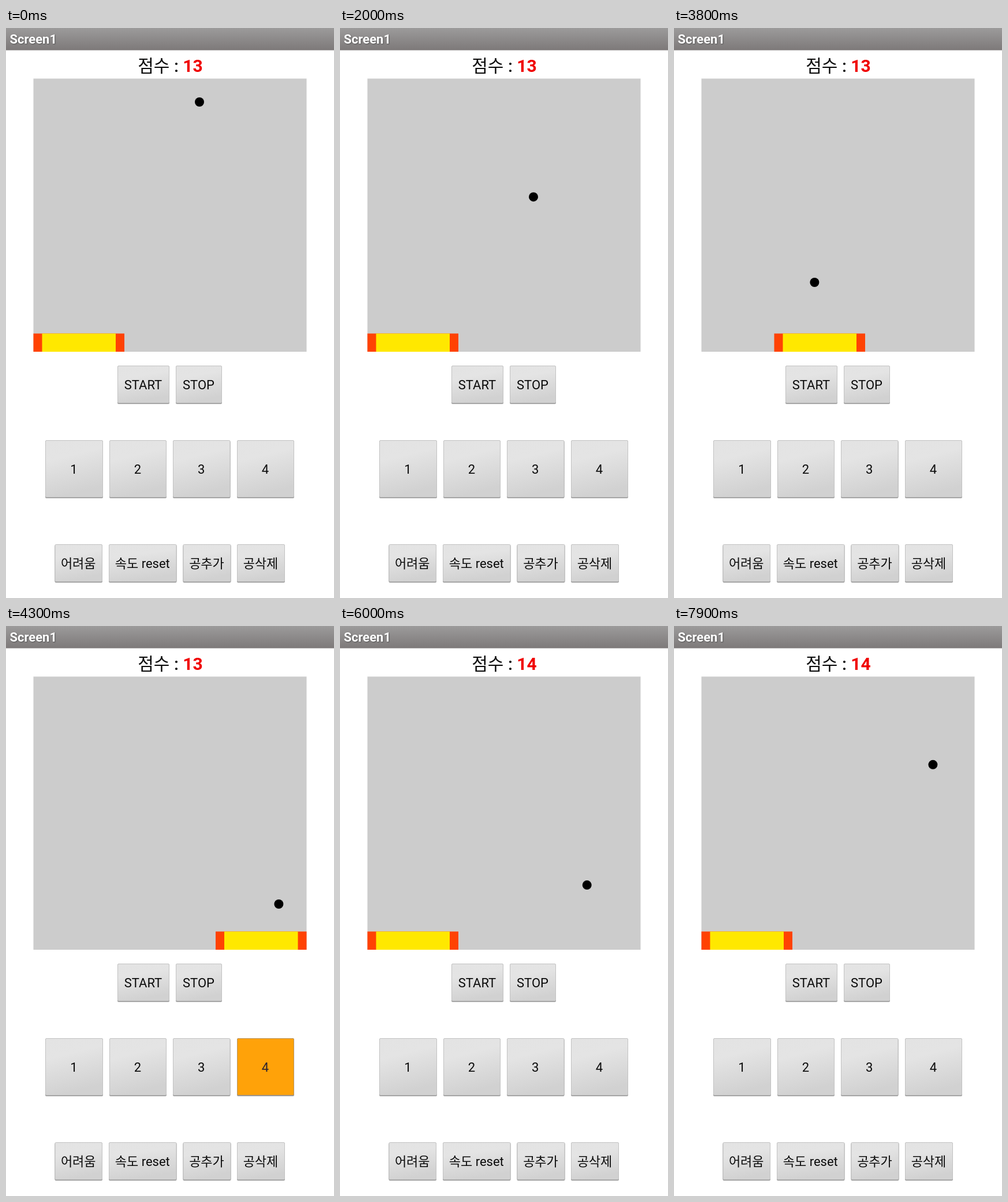
Write an HTML page that moves like this. It is 568x986 px and loops after 8 s.

```html
<!DOCTYPE html>
<html lang="ko">
<head>
<meta charset="utf-8">
<style>
html, body { margin: 0; width: 100%; height: 100%; overflow: hidden; background: #fff }
svg { display: block; width: 568px; height: 986px }
text { font: 22px Roboto, "Noto Sans CJK KR", "Noto Sans CJK", sans-serif; fill: #0a0a0a }
.title { font-weight: 700; fill: #fff }
.score { font-weight: 500; font-size: 30px }
.score tspan { font-weight: 700; fill: #f00000 }
.mid { text-anchor: middle }
.face { fill: url(#key); stroke: #c2c2c2 }
.on .face { fill: #ffa209; stroke: #b5956a }
.on text { fill: #2b2330 }
</style>
</head>
<body>
<svg viewBox="0 0 568 986">
  <defs>
    <linearGradient id="bar" x2="0" y2="1">
      <stop stop-color="#9c9b9b"/><stop offset="1" stop-color="#7d7979"/>
    </linearGradient>
    <linearGradient id="key" x2=".25" y2="1">
      <stop stop-color="#e3e3e3"/><stop offset=".35" stop-color="#e4e4e4"/><stop offset="1" stop-color="#d1d1d1"/>
    </linearGradient>
  </defs>
  <rect width="568" height="986" fill="#fff"/>
  <rect width="568" height="38.5" fill="url(#bar)"/>
  <text class="title" x="6.5" y="27" style="text-shadow:1px 1px 2px #555">Screen1</text>
  <text class="score mid" x="284.5" y="75.5">점수 : <tspan id="score">13</tspan></text>
  <rect x="47.5" y="87.5" width="473" height="472.5" fill="#ccc"/>
  <g id="paddle">
    <rect y="528.5" width="157.5" height="31.5" fill="#ff4203"/>
    <rect x="15" y="528.5" width="127.5" height="31.5" fill="#ffe800"/>
  </g>
  <circle id="ball" r="8"/>
  <g id="keys"></g>
</svg>
<script>
const $ = id => document.getElementById(id);
const LOOP = 8000, FRAME = 100, HIT = 5100;
const LEFT = 55, RIGHT = 513;

// each press: time, key, resulting paddle position
const presses = [[2600, '2', 173.5], [4200, '4', 363], [5000, '1', 47.5]];
const keys = {};

function addRow(y, h, items) {
  for (const [label, x, w] of items) {
    const g = document.createElementNS('http://www.w3.org/2000/svg', 'g');
    g.innerHTML = `
      <rect x="${x}" y="${y + 2}" width="${w}" height="${h}" rx="2" fill="#000" opacity=".12"/>
      <rect x="${x}" y="${y + 1}" width="${w}" height="${h}" rx="2" fill="#8f8f8f"/>
      <rect class="face" x="${x + .5}" y="${y + .5}" width="${w - 1}" height="${h - 1}" rx="1.5"/>
      <text class="mid" x="${x + w / 2 - .5}" y="${y + h / 2 + 8.5}">${label}</text>`;
    $('keys').append(g);
    keys[label] = g;
  }
}
addRow(584, 65, [['START', 193, 90], ['STOP', 294, 80]]);
addRow(713, 99, [['1', 68, 100], ['2', 179, 99], ['3', 289, 99.5], ['4', 400, 99]]);
addRow(893, 65, [['어려움', 84.5, 82.5], ['속도 reset', 178, 117.5], ['공추가', 306.5, 83], ['공삭제', 400, 83]]);

// folds straight travel into bouncing between the side walls
function bounce(travel) {
  const w = RIGHT - LEFT, d = travel % (2 * w);
  return LEFT + (d < w ? d : 2 * w - d);
}

function ballAt(t) {
  const down = Math.min(t, HIT), up = Math.max(t - HIT, 0);
  return [bounce(280 + .458 * down + .561 * up), 128 + .0821 * down - .1096 * up];
}

function draw(now) {
  const t = Math.floor(now % LOOP / FRAME) * FRAME;
  const [x, y] = ballAt(t);
  $('ball').setAttribute('cx', x);
  $('ball').setAttribute('cy', y);
  let px = 47.5;
  for (const [at, key, pos] of presses) {
    if (t >= at + 100) px = pos;
    keys[key].setAttribute('class', t >= at && t < at + 200 ? 'on' : '');
  }
  $('paddle').setAttribute('transform', `translate(${px})`);
  $('score').textContent = t < HIT ? 13 : 14;
}

let start;
function tick(now) {
  start ??= now;
  draw(now - start);
  requestAnimationFrame(tick);
}
draw(0);
requestAnimationFrame(tick);
</script>
</body>
</html>
```
